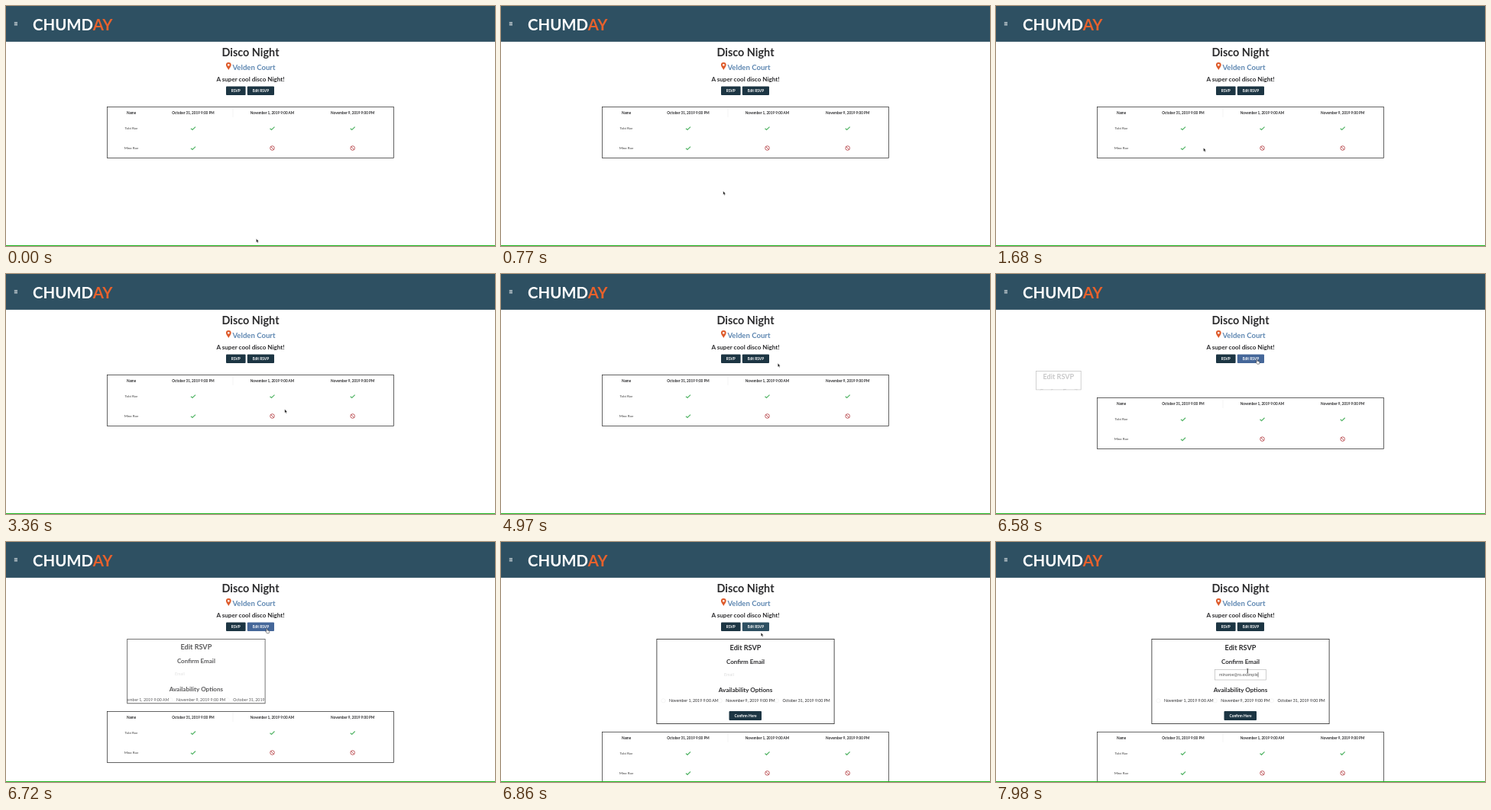
Write an HTML page that moves like this. It is 640x315 px and loops after 8 s.

```html
<!DOCTYPE html>
<html lang="en">
<head>
<meta charset="utf-8">
<title>Event page</title>
<style>
  html, body { margin: 0; height: 100%; overflow: hidden; background: #fff; }
  svg { display: block; }
  text { font-family: Lato, sans-serif; font-weight: 700; fill: #2b2b2d; text-anchor: middle; }
  .left { text-anchor: start; }
  .plain { font-weight: 400; }
  .button rect { fill: #1c3543; }
  .button text { fill: #fff; font-size: 4.8px; }
  .cell { font-size: 4.65px; }
  .guest { font-size: 4.5px; font-weight: 400; fill: #444; }
  .option { font-size: 5.25px; font-weight: 400; }
</style>
</head>
<body>
<svg id="stage" width="640" height="315" viewBox="0 0 640 315">
  <defs>
    <path id="yes" d="M-3 .2L-1 2L3-1.900" fill="none" stroke="#55b568" stroke-width="1.25"/>
    <g id="no" fill="none" stroke="#b8484c" stroke-width=".9">
      <circle r="2.8"/><path d="M-2-2L2 2"/>
    </g>
  </defs>

  <rect width="640" height="46.9" fill="#2e5062"/>
  <path d="M10.8 21.6h4.2M10.8 23.3h4.2M10.8 25h4.2" stroke="#fff" stroke-width=".8"/>
  <text class="left" x="35" y="32" font-size="20.4" style="fill:#fff">CHUMD<tspan fill="#e8612c">AY</tspan></text>

  <text x="320" y="65.8" font-size="14.4">Disco Night</text>
  <path d="M291.3 84C290 81.2 287.9 79.6 287.9 77.3a3.4 3.4 0 0 1 6.8 0C294.7 79.6 292.6 81.2 291.3 84zM291.3 75.9a1.4 1.4 0 1 0 .01 0z" fill="#de5b2b" fill-rule="evenodd"/>
  <text x="324.5" y="83.6" font-size="9.6" style="fill:#5f88b2">Velden Court</text>
  <text x="320" y="98.6" font-size="8.1">A super cool disco Night!</text>
  <g class="button"><rect x="288" y="105.4" width="25.6" height="11.6" rx="1"/><text x="300.8" y="112.9">RSVP</text></g>
  <g class="button"><rect id="edit" x="315.8" y="105.4" width="35.2" height="11.6" rx="1"/><text x="333.4" y="112.9">Edit RSVP</text></g>

  <svg id="form" y="127">
    <rect width="100%" height="100%" fill="#fff" stroke="#222" stroke-width="1.6"/>
    <g id="content">
      <text y="14.7" font-size="9.1">Edit RSVP</text>
      <text y="33" font-size="8">Confirm Email</text>
      <rect id="field" x="-33.5" y="40.5" width="67" height="13.5" fill="#fff" stroke="#bbb" stroke-width=".7"/>
      <text id="email" class="left plain" x="-28" y="49" font-size="5.5"></text>
      <path id="caret" stroke="#333" stroke-width=".6"/>
      <text y="70.4" font-size="8.1">Availability Options</text>
      <g id="options"></g>
      <g class="button"><rect x="-21.5" y="95" width="42.5" height="12" rx="1"/><text y="102.7">Confirm Here</text></g>
    </g>
  </svg>

  <g id="table">
    <rect x="132.5" y="132.5" width="375" height="67" fill="#fff" stroke="#222" stroke-width=".7"/>
    <path d="M297 134v12" stroke="#f2f2f2" stroke-width=".8"/>
  </g>
  <rect y="314" width="640" height="1" fill="#1cb41c"/>

  <g id="pointer">
    <path id="arrow" d="M0 0v4.6l1-.9l.8 1.7l.8-.4l-.8-1.6h1.4z" fill="#111" stroke="#fff" stroke-width=".3"/>
    <path id="hand" d="M-.5-.3q.8-.8 1.2.2v1.7l2.2.7q.7.3.5 1.3l-.6 2h-2.6l-1.800-2.500q0-.8 1.100 0z" fill="#fff" stroke="#222" stroke-width=".5"/>
    <path id="beam" d="M-1-3q1 0 1 .7v4.6q0 .7-1 .7M1-3q-1 0-1 .7v4.6q0 .7 1 .7" fill="none" stroke="#333" stroke-width=".6"/>
  </g>
</svg>
<script>
const LOOP = 8000, STEP = 70, OPEN = 6445, OPEN_TIME = 400;
const ADDRESS = "minaroe@ro.example";
const $ = id => document.getElementById(id);
const set = (id, attrs) => Object.entries(attrs).forEach(([k, v]) => $(id).setAttribute(k, v));
const show = (id, on) => { $(id).style.display = on ? "" : "none"; };
const clamp = x => Math.max(0, Math.min(1, x));
const swing = x => .5 - Math.cos(Math.PI * clamp(x)) / 2;

// Pointer stops: time, x, y
const path = [
  [0, 327.6, 305.6], [350, 306, 262], [840, 290, 242], [1050, 290, 242],
  [1680, 271.6, 186.2], [2000, 271.6, 186.2], [3360, 364.8, 177.6],
  [3700, 364.8, 177.6], [4970, 362.3, 117.2], [5400, 362.3, 117.2],
  [6100, 341.6, 112.6], [6650, 341.6, 112.6], [6860, 340.3, 119],
  [7280, 329.3, 169.3], [LOOP, 329.3, 169.3]
];

const label = (text, cls, x, y) => `<text class="${cls}" x="${x}" y="${y}">${text}</text>`;
const columns = [164, 245, 348.5, 453.7];
const heads = ["Name", "October 31, 2019 9:00 PM", "November 1, 2019 9:00 AM", "November 9, 2019 9:00 PM"];
const guests = [["Tobi Roe", "yes", "yes", "yes"], ["Mina Roe", "yes", "no", "no"]];

$("table").innerHTML += heads.map((h, i) => label(h, "cell", columns[i], 142)).join("") +
  guests.map((row, r) => row.map((v, i) => {
    const y = 160.5 + 26 * r;
    return i ? `<use href="#${v}" x="${columns[i]}" y="${y}"/>` : label(v, "guest", columns[0], y + 1.5);
  }).join("")).join("");

$("options").innerHTML = [heads[2], heads[3], heads[1]].map((text, i) => {
  const x = -100 + 74.2 * i;
  return `<circle cx="${x - 7.5}" cy="81.3" r="2.6" fill="none" stroke="#eee" stroke-width=".6"/>` +
    label(text, "option left", x, 83);
}).join("");

function pointerAt(t) {
  const i = path.findIndex(p => p[0] > t);
  const [t0, x0, y0] = path[i - 1], [t1, x1, y1] = path[i];
  const k = swing((t - t0) / (t1 - t0));
  return [x0 + (x1 - x0) * k, y0 + (y1 - y0) * k];
}

function draw(t) {
  const [x, y] = pointerAt(t);
  const overButton = x > 316 && x < 351 && y > 105 && y < 117;
  const overField = t > 7000 && y > 166;
  set("pointer", { transform: `translate(${x} ${y})` });
  show("hand", overButton);
  show("beam", overField);
  show("arrow", !overButton && !overField);
  $("edit").style.fill = overButton ? "#456799" : t > 6700 && t < 6900 ? "#2e5062" : "";

  // The form grows from the left edge: margin, width, height and opacity together
  const p = swing((t - OPEN) / OPEN_TIME), height = 112 * p ** 1.09;
  show("form", p > 0);
  set("form", { x: 203.5 * p, width: 233 * p, height, opacity: p });
  set("content", { transform: `translate(${116.5 * p} ${-4.6 * (1 - p)})` });
  set("table", { transform: `translate(0 ${p && height + 4.8})` });

  const typed = Math.round(ADDRESS.length * clamp((t - 7300) / 600));
  $("email").textContent = typed ? ADDRESS.slice(0, typed) : "Email";
  $("email").style.fill = typed ? "#555" : "#ddd";
  $("field").style.opacity = clamp((t - 6930) / 300);
  const end = -28 + (typed ? $("email").getComputedTextLength() : 0);
  set("caret", { d: `M${end + .4} 44v6.5` });
  show("caret", t >= 7300);
}

function tick() {
  const t = performance.now() % LOOP;
  draw(Math.floor(t / STEP) * STEP);
  requestAnimationFrame(tick);
}
tick();
</script>
</body>
</html>
```
